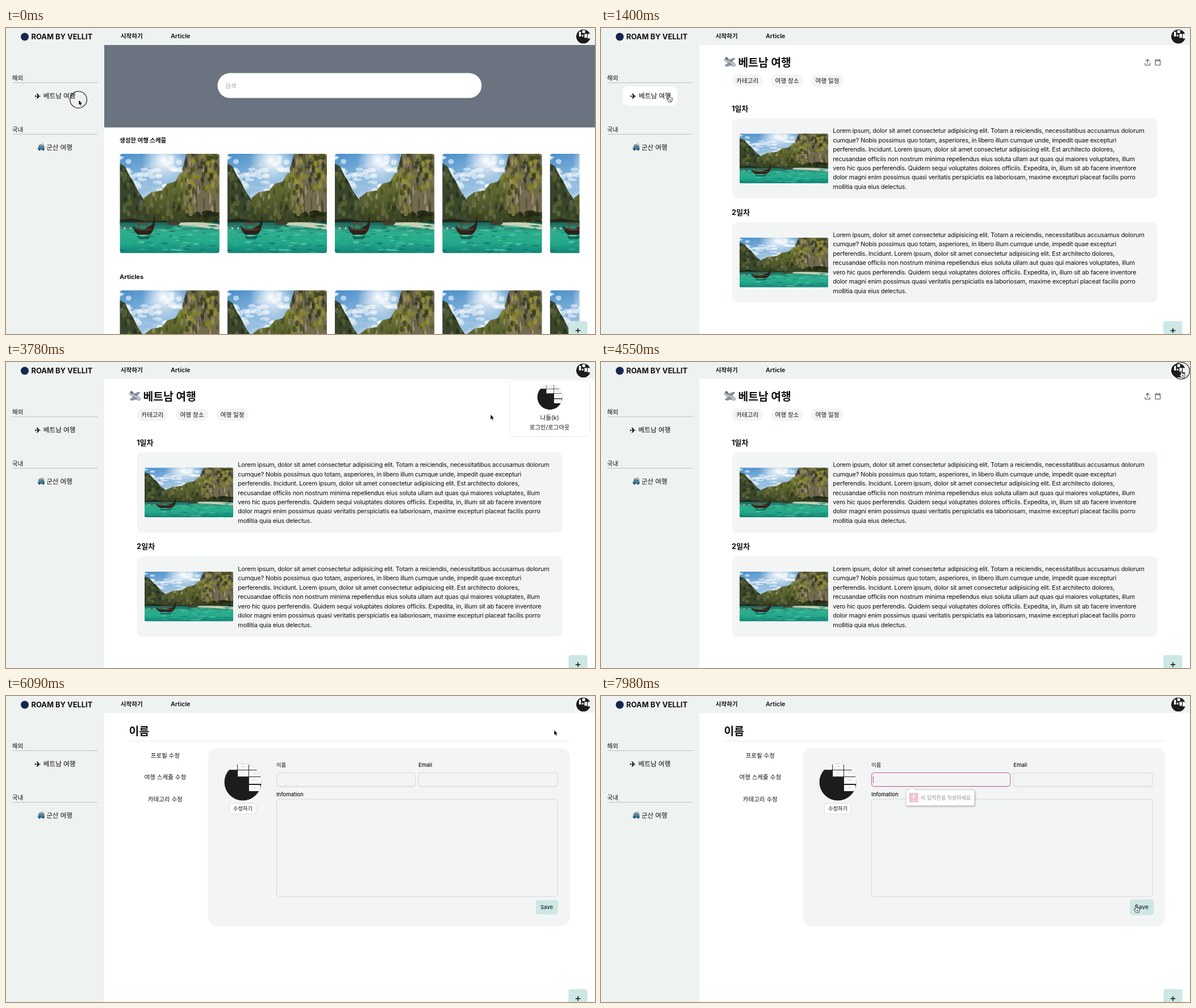
An HTML page for the animation above (8 s loop, 1037 px wide and 540 px high).

```html
<!DOCTYPE html>
<html lang="ko">
<head>
<meta charset="utf-8">
<title>여행 스케줄</title>
<style>
  html, body { margin: 0; width: 100%; height: 100%; overflow: hidden; background: #fff; }
  svg#stage { display: block; width: 100%; height: 100%; }
  text { font-family: Inter, "Noto Sans CJK KR", "Noto Sans CJK", sans-serif; white-space: pre; }
  .lorem { letter-spacing: -.21px; }
  .symbol { font-family: "DejaVu Sans", sans-serif; stroke: #111; stroke-width: .4px; }
</style>
</head>
<body>
<svg id="stage" viewBox="0 0 1037 540" xmlns="http://www.w3.org/2000/svg"></svg>
<script>
const LOOP = 8000;
const INK = '#111', PANEL = '#f3f5f4', BAR = '#eef2f1', MINT = '#cde7e4', LINE = '#d3d7da';

const rect = (x, y, w, h, r, fill, stroke = 'none') =>
  `<rect x="${x}" y="${y}" width="${w}" height="${h}" rx="${r}" fill="${fill}" stroke="${stroke}"/>`;
const text = (x, y, size, str, weight = 400, fill = INK, extra = '') =>
  `<text x="${x}" y="${y}" font-size="${size}" font-weight="${weight}" fill="${fill}" ${extra}>${str}</text>`;
const centered = (x, y, size, str, weight = 400, fill = INK) =>
  text(x, y, size, str, weight, fill, 'text-anchor="middle"');
const path = (d, fill, extra = '') => `<path d="${d}" fill="${fill}" ${extra}/>`;
const repeat = (n, fn) => Array.from({ length: n }, (_, i) => fn(i)).join('');

let seed = 11;
const rnd = (a, b) => {
  seed = (seed * 16807) % 2147483647;
  return a + (b - a) * seed / 2147483647;
};
const pick = list => list[Math.floor(rnd(0, list.length))];
const blobs = (n, [x0, y0, x1, y1], [rx, ry], colors, opacity) => repeat(n, () =>
  `<ellipse cx="${rnd(x0, x1).toFixed(1)}" cy="${rnd(y0, y1).toFixed(1)}" rx="${rnd(rx / 2, rx).toFixed(1)}"
    ry="${rnd(ry / 2, ry).toFixed(1)}" fill="${pick(colors)}" opacity="${opacity}"/>`);

const NEAR_CLIFF = 'M118 0H176V126L160 124L145 120L131 115L118 112L111 78L116 50L110 28Z';
const FAR_CLIFF = 'M40 122L43 78L56 68L74 65L84 53L98 49L106 35L116 32L145 100V125Z';
const LEFT_CLIFF = 'M0 17L9 22L17 38L25 51L32 66L42 80L47 96L46 122H0Z';
const clip = (id, d) => `<clipPath id="${id}"><path d="${d}"/></clipPath>`;
const gradient = (id, x2, y2, ...colors) => `<linearGradient id="${id}" x1="0" y1="0" x2="${x2}" y2="${y2}">${
  colors.map((c, i) => `<stop offset="${i / (colors.length - 1)}" stop-color="${c}"/>`).join('')}</linearGradient>`;

function photoSymbol() {
  return `${gradient('sky', .3, 1, '#4a8fca', '#b7d3e8', '#eef4f6')}
    ${gradient('sea', 0, 1, '#1d5f58', '#2fae8d', '#23a888', '#128378')}
    ${gradient('farTone', 0, 1, '#777b38', '#59612f', '#303b20')}
    <radialGradient id="sun"><stop offset="0" stop-color="#fff"/><stop offset="1" stop-color="#fff" stop-opacity="0"/></radialGradient>
    ${clip('near', NEAR_CLIFF)}${clip('far', FAR_CLIFF)}${clip('left', LEFT_CLIFF)}
    <symbol id="photo" viewBox="0 0 176 176" preserveAspectRatio="none">
      <rect width="176" height="176" fill="url(#sky)"/>
      ${blobs(60, [0, 6, 115, 68], [9, 5], ['#fff', '#f3f8fb', '#fff', '#8fbce0'], .55)}
      <circle cx="77" cy="12" r="38" fill="url(#sun)"/>
      ${path(FAR_CLIFF, 'url(#farTone)')}
      <g clip-path="url(#far)">
        ${blobs(55, [42, 35, 125, 85], [3, 7], ['#8c8b36', '#565f28', '#9c9770', '#3d4721'], .6)}
        ${blobs(40, [42, 82, 130, 122], [4, 7], ['#626a2f', '#252f1a', '#6f6f4a', '#38421f'], .65)}
      </g>
      ${path(LEFT_CLIFF, '#39452a')}
      <g clip-path="url(#left)">${blobs(50, [0, 18, 47, 122], [4, 6], ['#5f6b33', '#1e2917', '#4b5733', '#6b7358'], .6)}</g>
      ${path(NEAR_CLIFF, '#736b4f')}
      <g clip-path="url(#near)">
        ${blobs(60, [114, 0, 176, 112], [2.5, 12], ['#b5a68b', '#4b4532', '#958969', '#35341f'], .6)}
        ${blobs(60, [110, 0, 176, 68], [4.5, 6], ['#83852c', '#4c5718', '#9a9430', '#2c351a'], .7)}
        ${blobs(24, [110, 30, 130, 112], [4, 8], ['#6c7029', '#37411c', '#85843c'], .7)}
        ${blobs(34, [118, 104, 176, 124], [9, 6], ['#1f2715', '#333c1d'], .85)}
      </g>
      ${path('M0 117L20 114L45 119L90 119V126H0Z', '#1f2818')}
      <rect y="121" width="176" height="55" fill="url(#sea)"/>
      ${path('M90 123Q135 118 176 125V134Q130 128 90 125Z', '#c9d0b4')}
      ${blobs(80, [0, 126, 176, 176], [8, 1.6], ['#52d5ab', '#0b5f5c', '#2ec09a', '#0f7f75', '#7addc2'], .55)}
      ${path('M82 120H108L104 126H88Z', '#443d2d')}
      ${path('M23 127Q30 134 44 133L57 125L62 106L62 124Q59 140 52 143H32Q25 138 23 127Z', '#2f211b')}
      ${path('M29 122H50V125H29ZM33 125H35V133H33ZM46 125H48V133H46Z', '#5f4936')}
      ${path('M26 131Q35 138 56 133', 'none', 'stroke="#8d5a38" stroke-width="1"')}
      ${path('M30 145Q45 149 56 143L50 151H34Z', '#0d4b45', 'opacity=".7"')}
      ${repeat(4, i => `<circle cx="${4 + i * 5}" cy="${130 + i % 2 * 2}" r="1.5" fill="${i % 2 ? '#d8d5cc' : '#8e4a43'}"/>`)}
    </symbol>`;
}

const AVATAR_CELLS = [[-28, -33, 18, 11], [-9, -33, 19, 11], [11, -33, 22, 11], [-9, -21, 19, 11],
  [11, -21, 22, 11], [11, -9, 22, 12], [11, 5, 20, 11]];
const BADGE_CELLS = [[-20, -22, 9, 22], [-5, -29, 13, 13], [5, -12, 12, 18], [20, -12, 13, 21], [-7, -8, 7, 8]];
const disc = (id, cells) => `<g id="${id}" clip-path="url(#disc)"><circle r="33" fill="#1c1c1c"/>
  ${cells.map(([x, y, w, h]) => rect(x, y, w, h, 0, '#fafafa') +
    rect(x + w * .3, y + h * .4, w * .35, 1, 0, '#c9cfca')).join('')}</g>`;
const avatarDefs = '<clipPath id="disc"><circle r="33"/></clipPath>' +
  disc('avatar', AVATAR_CELLS) + disc('badge', BADGE_CELLS);
const avatar = (x, y, r, id = 'avatar') => `<use href="#${id}" transform="translate(${x} ${y}) scale(${r / 33})"/>`;

const photo = (x, y, w, h) => `<use href="#photo" x="${x}" y="${y}" width="${w}" height="${h}"/>`;
const photoRow = y => `<g clip-path="url(#rowClip)">${repeat(5, i =>
  `<g transform="translate(${200.3 + i * 189.3} ${y})"><g clip-path="url(#cardClip)">${photo(0, 0, 175.6, 175.6)}</g></g>`)}</g>`;

const home = `
  ${rect(173, 30, 864, 145.5, 0, '#6b7280')}
  ${rect(372.4, 79.6, 465, 44, 22, '#fff')}
  ${text(386, 105.5, 10.6, '검색', 400, '#a3a3a3')}
  ${text(200, 201.5, 10.5, '생성한 여행 스케줄', 700)}
  ${photoRow(222)}
  ${text(200, 443, 11, 'Articles', 700)}
  ${photoRow(463)}`;

const LOREM = [
  'Lorem ipsum, dolor sit amet consectetur adipisicing elit. Totam a reiciendis, necessitatibus accusamus dolorum',
  'cumque? Nobis possimus quo totam, asperiores, in libero illum cumque unde, impedit quae excepturi',
  'perferendis. Incidunt. Lorem ipsum, dolor sit amet consectetur adipisicing elit. Est architecto dolores,',
  'recusandae officiis non nostrum minima repellendus eius soluta ullam aut quas qui maiores voluptates, illum',
  'vero hic quos perferendis. Quidem sequi voluptates dolores officiis. Expedita, in, illum sit ab facere inventore',
  'dolor magni enim possimus quasi veritatis perspiciatis ea laboriosam, maxime excepturi placeat facilis porro',
  'mollitia quia eius delectus.'];

const day = n => `<g transform="translate(0 ${(n - 1) * 183.7})">
  ${text(230, 146.5, 13, n + '일차', 700)}
  ${rect(230.3, 159, 749.2, 142, 10, PANEL)}
  <g clip-path="url(#wideClip)">${photo(244, 186.3, 156, 87.8)}</g>
  ${LOREM.map((line, i) => text(408.3, 185.2 + i * 16.45, 10.9, line, 400, INK, 'class="lorem"')).join('')}
</g>`;
const tag = (x, w, str) => rect(x, 82, w, 22, 11, PANEL) + centered(x + w / 2, 97.2, 10.6, str);

const schedule = `
  <g stroke="#596572" stroke-width=".5">
    ${path('M221 52L236 63Q238 67 235 68Q231 68 228 65L217.5 57.5Q217 52 221 52Z', '#b9c2c8')}
    ${path('M230 60L236 54L233 53L224 57ZM225 61L218 66L222 68L231 65Z', '#8795a1')}
    ${path('M219 53L221 51L224 55L222 57Z', '#53677a')}
  </g>
  ${text(241.5, 67.5, 19.3, '베트남 여행', 700)}
  ${tag(230.5, 54.5, '카테고리')}${tag(299, 57, '여행 장소')}${tag(370, 57, '여행 일정')}
  <g fill="none" stroke="#555" stroke-width="1.1" stroke-linecap="round" stroke-linejoin="round">
    <path d="M958 62V65.5H966.5V62M962.2 62.5V55.5M959.5 58L962.2 55.3L965 58"/>
    <path d="M976 56.5H984.5V65.5H976ZM976 58H984.5M978 55V56.5M982.5 55V56.5"/>
  </g>
  ${day(1)}${day(2)}
  <g id="popup">
    ${rect(886.5, 31.5, 142, 100, 10, '#fff', '#e5e7eb')}
    ${avatar(957.5, 62, 22.2)}
    ${centered(957, 102, 10.6, '나들(k)')}
    ${centered(957, 118.5, 10.4, '로그인/로그아웃')}
  </g>`;

const profile = `
  ${text(216.5, 68.5, 19.3, '이름', 700)}
  ${rect(217, 79, 776, 1, 0, '#e5e7eb')}
  ${['프로필 수정', '여행 스케줄 수정', '카테고리 수정'].map((s, i) => centered(280.3, 108.7 + i * 38.4, 10.5, s)).join('')}
  ${rect(355.5, 91.5, 637.5, 315, 17, PANEL)}
  ${avatar(417, 152, 32.7)}
  ${rect(393.8, 189.3, 46.5, 19, 4, '#fff', '#d8dcdc')}
  ${centered(417, 202.2, 9.3, '수정하기', 500)}
  ${text(476, 124.5, 9.3, '이름', 500)}
  ${text(726.3, 124.5, 9.4, 'Email', 500)}
  ${text(476, 177, 9.4, 'Infomation', 500)}
  ${rect(476.5, 136.5, 244, 24, 4, 'none', '#e4e7e8')}
  ${rect(726.5, 136.5, 244.5, 24, 4, 'none', '#e4e7e8')}
  <rect id="nameInput" x="476.5" y="135.5" width="244" height="24" rx="4" fill="${PANEL}" stroke="${LINE}"/>
  ${rect(726.5, 135.5, 244.5, 24, 4, PANEL, LINE)}
  ${rect(476.5, 182, 494.5, 172, 4, 'none', LINE)}
  <g id="save">
    ${rect(933, 361.2, 38.5, 24.5, 4, '#dfe6e5')}${rect(933, 360, 38.5, 24.5, 4, MINT)}
    ${centered(952, 375.6, 9.5, 'Save', 500, '#1f2937')}
  </g>
  <rect id="caret" x="479" y="141.5" width="1" height="12" fill="#c0447c"/>
  <g id="tooltip">
    <path d="M539 165.5H543L548 160.5L553 165.5H655Q657.5 165.5 657.5 168V191Q657.5 193.5 655 193.5H539.5Q537 193.5 537 191V168Q537 165.5 539 165.5Z"
      fill="#fff" stroke="#c9cccb" filter="url(#shadow)"/>
    <g id="tooltipBody">
      ${rect(542.5, 171, 16, 16.5, 1.5, '#e58fb9')}
      ${rect(549.5, 173.5, 2, 7.5, 0, '#fff')}${rect(549.5, 183, 2, 2, 0, '#fff')}
      ${text(563, 182.6, 9, '이 입력란을 작성하세요.', 400, '#333')}
    </g>
  </g>`;

const bus = `<g>
  ${rect(57, 206, 11, 6, 1.5, '#a9b9bd')}${rect(56, 210.5, 12, 4.5, 1, '#2f78a6')}
  ${repeat(3, i => rect(58 + i * 3, 207.5, 2.3, 2.6, 0, '#47616e'))}
  <path d="M59 206L66 204.5" stroke="#777"/><circle cx="59" cy="215" r="1.4" fill="#333"/><circle cx="65.5" cy="215" r="1.4" fill="#333"/>
</g>`;

const chrome = `
  ${rect(0, 0, 1037, 30, 0, BAR)}${rect(0, 0, 173, 540, 0, BAR)}
  <circle cx="33" cy="15.5" r="7" fill="#14284f"/>
  ${text(44.5, 20.2, 12.9, 'ROAM BY VELLIT', 700)}
  ${text(201.7, 17.8, 10.6, '시작하기', 600)}
  ${text(290, 17.8, 10.8, 'Article', 600)}
  ${avatar(1016.5, 15, 12.6, 'badge')}
  ${text(10.7, 91.7, 10.7, '해외')}${rect(11, 96, 150.5, 1, 0, '#bcc0bf')}
  ${text(10.7, 182.7, 10.7, '국내')}${rect(11, 187, 150.5, 1, 0, '#bcc0bf')}
  <g id="pill">${rect(38, 103, 96.3, 34, 10, '#fff')}</g>
  <g id="trip">${text(50.5, 124.5, 13, '✈\uFE0E', 400, INK, 'class="symbol"')}${text(65.7, 124.2, 11.7, '베트남 여행', 500)}</g>
  ${bus}${text(71.2, 215.2, 11.6, '군산 여행', 500)}`;

const overlay = `
  ${rect(990.3, 517.3, 33.3, 30, 4, MINT)}
  <path d="M1002.7 534H1011.3M1006.9 529.7V538.3" stroke="#111" stroke-width="1.5"/>
  <g id="pointer">
    <circle id="ring" cx="-.5" cy="-.5" r="14.8" fill="none" stroke="#111" stroke-width="1.1"/>
    <path id="arrow" d="M0 0V9.3L2.1 7.4L3.7 10.7L5.2 10L3.7 6.8H6.5Z" fill="#000" stroke="#fff" stroke-width=".6"/>
    <path id="hand" d="M-1 0Q.8-.8 1 1V4.2Q2.2 3.2 3 4.5Q4.2 3.6 4.8 5Q6.2 4.7 6.2 6.5Q6.3 9 5 10.5V12H-.4Q-1 10-3.2 7.7Q-3.8 6.3-2.5 6.2L-1.2 7.4Z M1.4 7V10M3.2 7V10"
      fill="#fff" stroke="#111" stroke-width=".8" stroke-linejoin="round"/>
  </g>`;

const stage = document.getElementById('stage');
stage.innerHTML = `<defs>${photoSymbol()}${avatarDefs}
    <clipPath id="rowClip"><rect x="173" y="200" width="836.5" height="340"/></clipPath>
    <clipPath id="cardClip"><rect width="175.6" height="175.6" rx="4.5"/></clipPath>
    <clipPath id="wideClip"><rect x="244" y="186.3" width="156" height="87.8" rx="2.5"/></clipPath>
    <filter id="shadow"><feDropShadow dx="1" dy="1.5" stdDeviation="1.5" flood-opacity=".25"/></filter>
  </defs>
  <rect width="1037" height="540" fill="#fff"/>
  <g id="home">${home}</g><g id="schedule">${schedule}</g><g id="profile">${profile}</g>
  ${chrome}${overlay}`;

const el = {};
stage.querySelectorAll('g[id], rect[id], path[id], circle[id]').forEach(node => el[node.id] = node);
const show = (name, on) => el[name].setAttribute('display', on ? 'inline' : 'none');
const clamp = v => Math.min(1, Math.max(0, v));
const smooth = v => v * v * (3 - 2 * v);
const within = (t, spans) => spans.some(([from, to]) => t >= from && t < to);

// Pointer stops: time, x, y
const STOPS = [[0, 128, 127], [420, 128, 127], [700, 119.5, 118.5], [1400, 119.5, 118.5], [2380, 1022, 5.5],
  [2800, 1022, 5.5], [3780, 853, 92.5], [4060, 1022, 16], [4690, 1022, 16],
  [4970, 965, 60], [6650, 965, 60], [7420, 942, 370]];
const CLICKS = [[0, 140], [1260, 1400], [2590, 2730], [4060, 4200], [4550, 4690], [5180, 5320], [7560, 7700]];
const POPUP_OPEN = [[2800, 4200], [4690, 6090]];
const SCHEDULE_AT = 1400, PROFILE_AT = 6090, FOCUS_AT = 7700;

function pointerAt(t) {
  const next = STOPS.findIndex(s => s[0] > t);
  if (next < 0) return STOPS[STOPS.length - 1].slice(1);
  const [t0, x0, y0] = STOPS[next - 1], [t1, x1, y1] = STOPS[next];
  const k = smooth((t - t0) / (t1 - t0));
  return [x0 + (x1 - x0) * k, y0 + (y1 - y0) * k];
}

function render(t) {
  const [x, y] = pointerAt(t);
  const over = (x0, y0, x1, y1) => x >= x0 && x <= x1 && y >= y0 && y <= y1;
  const onTrip = t >= 420 && over(38, 103, 134, 137);
  const onAvatar = over(1004, 2, 1029, 28);
  const onSave = t >= PROFILE_AT && over(933, 360, 971, 385);
  const onHand = onTrip || onAvatar || onSave;

  show('home', t < SCHEDULE_AT);
  show('schedule', t >= SCHEDULE_AT && t < PROFILE_AT);
  show('popup', within(t, POPUP_OPEN));
  show('profile', t >= PROFILE_AT);
  show('pill', onTrip);
  el.trip.setAttribute('transform', `translate(${onTrip ? .8 : 0} 0)`);

  const grow = 1 + (onSave ? .1 * smooth(clamp((y - 360) / 9)) : 0);
  el.save.setAttribute('transform', `translate(952.2 372.3) scale(${grow}) translate(-952.2 -372.3)`);
  const focused = t >= FOCUS_AT;
  el.nameInput.setAttribute('stroke', focused ? '#c6588b' : LINE);
  show('caret', focused);
  show('tooltip', t >= FOCUS_AT + 70);
  el.tooltipBody.setAttribute('opacity', clamp((t - FOCUS_AT - 70) / 400));

  el.pointer.setAttribute('transform', `translate(${x.toFixed(2)} ${y.toFixed(2)})`);
  show('arrow', !onHand);
  show('hand', onHand);
  show('ring', within(t, CLICKS));
}

const start = performance.now();
function tick() {
  render((performance.now() - start) % LOOP);
  requestAnimationFrame(tick);
}
tick();
</script>
</body>
</html>
```
